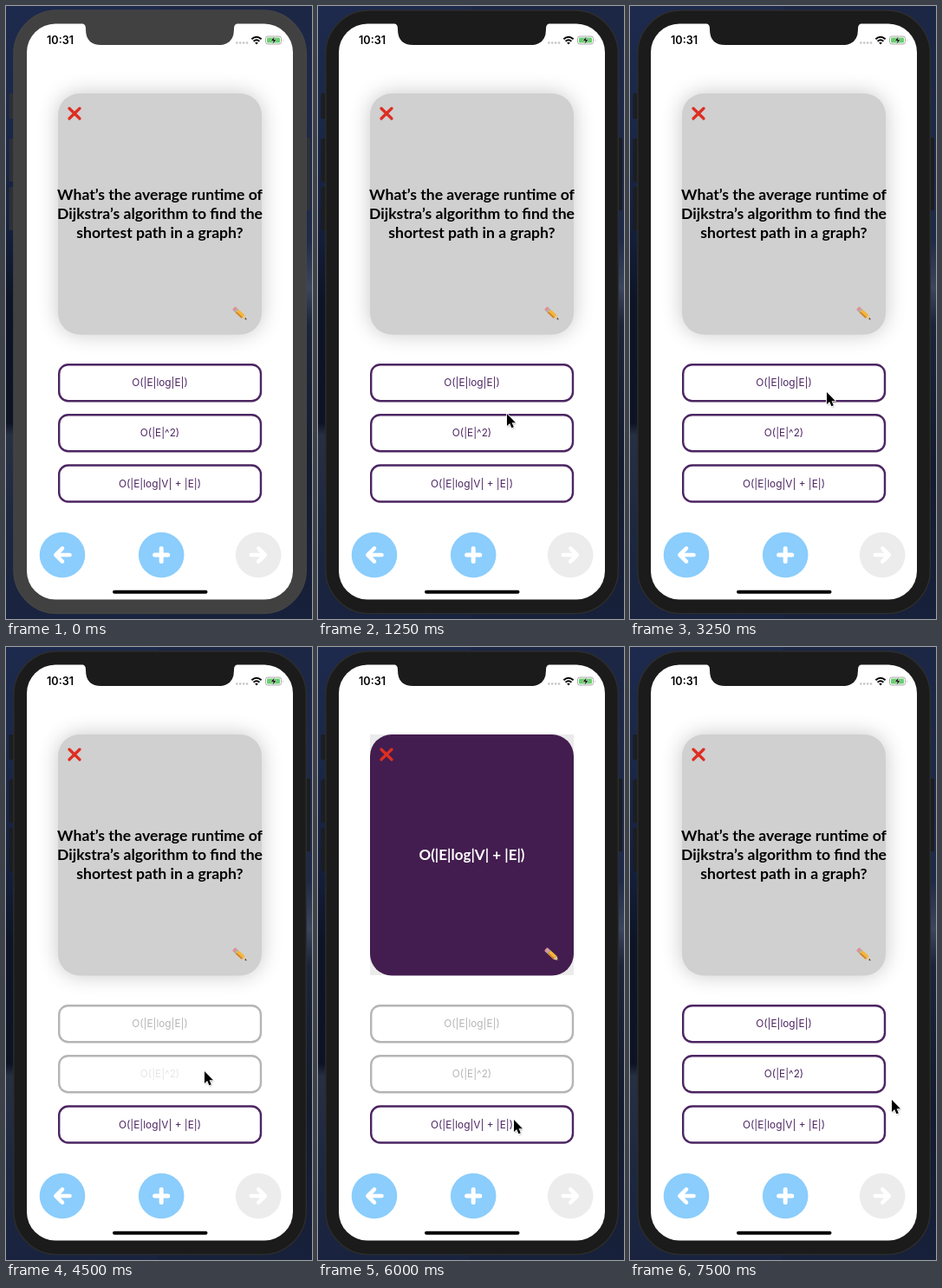
Write an HTML page that moves like this. It is 353 px wide and 708 px high and loops after 8000 ms.

```html
<!DOCTYPE html>
<html lang="en">
<head>
<meta charset="utf-8">
<title>Flashcards</title>
<style>
  html, body { margin: 0; width: 100%; height: 100%; overflow: hidden; background: #1a2442; }
  svg { display: block; width: 100vw; height: 100vh; }
  text { text-anchor: middle; }
  .clock { font: 600 12.6px Inter, Roboto, sans-serif; fill: #000; }
  .card { font: 700 17.6px Lato, "Open Sans", sans-serif; }
  .answer { font: 700 17px Lato, "Open Sans", sans-serif; fill: #fff; }
  .option text { font: 400 11.8px Inter, Roboto, sans-serif; }
  .option rect { fill: #fff; stroke-width: 2.4; }
</style>
</head>
<body>
<svg viewBox="0 0 353 708" xmlns="http://www.w3.org/2000/svg">
  <defs>
    <linearGradient id="sky" x1="0" y1="0" x2="0" y2="1">
      <stop offset="0" stop-color="#1d2a4d"/>
      <stop offset=".2" stop-color="#1a2747"/>
      <stop offset=".36" stop-color="#15203d"/>
      <stop offset=".48" stop-color="#0d1426"/>
      <stop offset=".68" stop-color="#0d1323"/>
      <stop offset=".7" stop-color="#272f43"/>
      <stop offset=".85" stop-color="#1c2740"/>
      <stop offset="1" stop-color="#19233f"/>
    </linearGradient>
    <linearGradient id="ridge" x1="0" y1="0" x2="0" y2="1">
      <stop offset="0" stop-color="#1c2746"/>
      <stop offset=".38" stop-color="#1f2a48"/>
      <stop offset=".46" stop-color="#3b455c"/>
      <stop offset=".52" stop-color="#1b2438"/>
      <stop offset=".75" stop-color="#131b2f"/>
      <stop offset="1" stop-color="#18213b"/>
    </linearGradient>
    <filter id="blur" x="-20%" y="-20%" width="140%" height="140%">
      <feGaussianBlur stdDeviation="12"/>
    </filter>
    <filter id="soft" x="-50%" y="-50%" width="200%" height="200%">
      <feGaussianBlur stdDeviation="1"/>
    </filter>
    <path id="arrow" d="M8.5 0H-7M0 -7.6L-7.6 0L0 7.6" fill="none" stroke="#fff"
      stroke-width="4.6" stroke-linecap="round" stroke-linejoin="round"/>
    <path id="pointer" d="M0 0V14L3.2 11.1L5.4 16.2L7.8 15.2L5.6 10.2H10Z"/>
  </defs>

  <rect width="353" height="708" fill="url(#sky)"/>
  <rect x="176" width="177" height="708" fill="url(#ridge)"/>

  <g id="keys">
    <rect x="3.5" y="101" width="7" height="29" rx="1.5"/>
    <rect x="3.5" y="153" width="7" height="50" rx="1.5"/>
    <rect x="3.5" y="209" width="7" height="50" rx="1.5"/>
    <rect x="344" y="152" width="7" height="84" rx="1.5"/>
  </g>
  <rect id="bezel" x="8.9" y="5" width="337.4" height="696.6" rx="50" stroke-width="1.4"/>
  <rect x="24" y="20.5" width="307" height="665" rx="33" fill="#fff"/>
  <path id="notch" d="M86 19.5Q92 20 92 26V27Q92 45 110 45H245Q263 45 263 27V26Q263 20 269 19.5Z"/>

  <text class="clock" x="62.5" y="44">10:31</text>
  <g fill="#c4c4c4">
    <circle cx="266.3" cy="42.5" r="1.3"/><circle cx="270.2" cy="42.5" r="1.3"/>
    <circle cx="274.1" cy="42.5" r="1.3"/><circle cx="278" cy="42.5" r="1.3"/>
  </g>
  <g fill="none" stroke="#000" stroke-width="2">
    <path d="M283.4 38.3Q289 33.2 294.6 38.3M285.6 40.7Q289 37.8 292.4 40.7"/>
    <path d="M287.2 42.4Q289 41 290.8 42.4L289 44.4Z" fill="#000" stroke="none"/>
  </g>
  <rect x="299.5" y="35" width="18" height="9" rx="2.5" fill="#fff" stroke="#a8a8a8"/>
  <rect x="301" y="36.5" width="15" height="6" rx="1.3" fill="#66cf6d"/>
  <path d="M319 38V41.4Q320.3 39.7 319 38Z" fill="#a8a8a8"/>
  <path d="M310 34.8L305.4 40.2H308.4L307.4 44.4L312 38.8H309Z" fill="#000" stroke="#fff" stroke-width=".5"/>

  <rect id="shadow" x="60" y="101" width="235" height="278" rx="25" fill="#000" opacity=".22" filter="url(#blur)"/>
  <rect id="corners" x="60" y="101" width="235" height="278" fill="#ebebeb"/>
  <rect id="face" x="60" y="101" width="235" height="278.5" rx="25"/>
  <g id="front" class="card">
    <text x="177.5" y="224">What’s the average runtime of</text>
    <text x="177.5" y="246">Dijkstra’s algorithm to find the</text>
    <text x="177.5" y="268.3">shortest path in a graph?</text>
  </g>
  <text id="back" class="answer" x="177.5" y="246">O(|E|log|V| + |E|)</text>
  <path d="M73 118.2L85 130M85 118.2L73 130" stroke="#dd2e22" stroke-width="3.3" stroke-linecap="round"/>
  <g transform="translate(262.6 348.8) rotate(42)">
    <rect x="0" y="-2.6" width="4" height="5.2" rx="1.4" fill="#e58f94"/>
    <rect x="3" y="-2.6" width="2.2" height="5.2" fill="#a9b0b5"/>
    <rect x="5.2" y="-2.6" width="9.6" height="5.2" fill="#f3b53c"/>
    <rect x="5.2" y="1" width="9.6" height="1.6" fill="#cf7f2a"/>
    <path d="M14.8 -2.6L20 0L14.8 2.6Z" fill="#e6c49a"/>
    <path d="M18 -1L20.4 0L18 1Z" fill="#333"/>
  </g>

  <g id="options"></g>

  <g transform="translate(65 634)"><circle r="26.3" fill="#8bcdfc"/><use href="#arrow"/></g>
  <g transform="translate(179.2 634)">
    <circle r="26.3" fill="#8bcdfc"/>
    <path d="M-7.6 0H7.6M0 -7.6V7.6" stroke="#fff" stroke-width="5" stroke-linecap="round"/>
  </g>
  <g transform="translate(291.2 634)"><circle r="26.3" fill="#ececec"/><use href="#arrow" transform="scale(-1 1)"/></g>
  <rect x="123" y="674.8" width="109.5" height="4" rx="2" fill="#000"/>

  <g id="cursor">
    <use href="#pointer" x=".8" y="1.6" opacity=".35" filter="url(#soft)"/>
    <use href="#pointer" fill="#000" stroke="#fff" stroke-width="1.6" stroke-linejoin="round" paint-order="stroke"/>
  </g>
</svg>
<script>
  const LOOP = 8000;
  const INK = "#4c2562", GRAY = "#b5b5b5", PALE = "#e6e6e6", FADED = "#d2d2d2";
  const $ = id => document.getElementById(id);

  // Every track is a list of [start ms, value].
  const pointer = [
    [0, null], [250, [284, 78]], [500, [290, 54]], [1000, [186, 598]],
    [1250, [218, 471]], [1500, [225, 447]], [2000, [226, 447]], [2750, [227, 446]],
    [3750, [229, 480]], [4000, [229, 489]], [4250, [229, 490]], [5000, [227, 523]],
    [5250, [226, 546]], [6250, [230, 543]], [6500, [286, 528]], [6750, [302, 523]]
  ];
  const focus = [[0, false], [500, true]];
  const flipped = [[0, false], [6000, true], [7500, false]];
  const turning = [[0, false], [5750, true], [6250, false]];
  const options = [
    { label: "O(|E|log|E|)", y: 413,
      border: [[0, INK], [3500, GRAY], [7500, INK]],
      text: [[0, INK], [3500, PALE], [3750, GRAY], [7500, INK]] },
    { label: "O(|E|^2)", y: 471,
      border: [[0, INK], [4500, GRAY], [7500, INK]],
      text: [[0, INK], [4500, PALE], [4750, GRAY], [7500, INK]] },
    { label: "O(|E|log|V| + |E|)", y: 529.3,
      border: [[0, INK]],
      text: [[0, INK], [5750, FADED], [6000, INK]] }
  ];

  const at = (track, t) => track.filter(step => step[0] <= t).pop()[1];
  const show = (id, on) => $(id).setAttribute("visibility", on ? "visible" : "hidden");

  $("options").innerHTML = options.map(o => `<g class="option">
    <rect x="61.2" y="${o.y + 1.2}" width="232.8" height="42" rx="10.5"/>
    <text x="177.5" y="${o.y + 26.3}">${o.label}</text></g>`).join("");
  const groups = [...document.querySelectorAll(".option")];

  function draw(t) {
    const active = at(focus, t), back = at(flipped, t), turn = at(turning, t);
    $("bezel").setAttribute("fill", active ? "#1b1b1b" : "#414141");
    $("bezel").setAttribute("stroke", active ? "#2d2d2d" : "#444");
    $("notch").setAttribute("fill", active ? "#1b1b1b" : "#414141");
    $("keys").setAttribute("fill", active ? "#1c1d20" : "#2c3037");

    $("face").setAttribute("fill", back ? "#431d4f" : "#d0d0d0");
    show("front", !back);
    show("back", back);
    show("shadow", !turn);
    show("corners", turn);

    options.forEach((o, i) => {
      const [box, label] = groups[i].children;
      box.setAttribute("stroke", at(o.border, t));
      label.setAttribute("fill", at(o.text, t));
    });

    const p = at(pointer, t);
    show("cursor", p);
    if (p) $("cursor").setAttribute("transform", `translate(${p})`);
  }

  const start = performance.now();
  function tick() {
    draw((performance.now() - start) % LOOP);
    requestAnimationFrame(tick);
  }
  tick();
</script>
</body>
</html>
```
